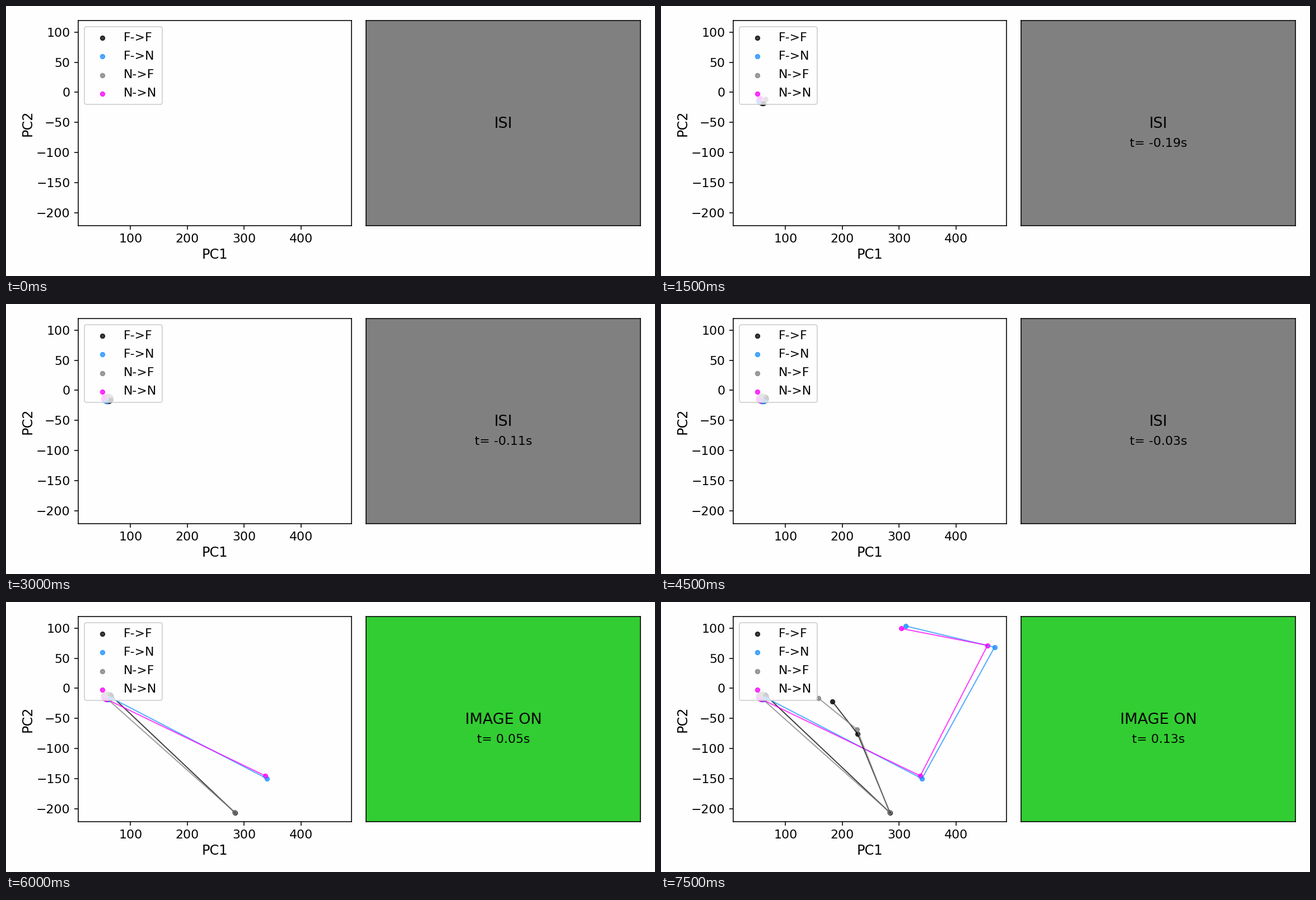
A matplotlib script for the animation above (8000 ms loop, 1159 by 483 pixels).

```python
from math import cos, radians, sin

import matplotlib.pyplot as plt
from matplotlib.animation import FuncAnimation

W, H, DPI = 1159, 483, 144
INTERVAL = 250
FRAMES_PER_STEP = 3
N_FRAMES = 32
REST_STEPS = 7

# Condition: colour, starting angle of the resting drift, points of the response
CONDITIONS = {
    "F->F": ("black", -95, [(284, -206.4), (227, -75.6), (182.6, -21.8)]),
    "F->N": ("dodgerblue", -164, [(340.3, -149.8), (468, 68.2), (311.7, 103.4)]),
    "N->F": ("gray", 20, [(283.2, -205.5), (226, -68.2), (158, -16.2)]),
    "N->N": ("magenta", 120, [(337.4, -145.2), (455.7, 71.4), (304, 99.3)]),
}


def rest_point(phase, k):
    """Before the image, activity drifts slowly around a small ellipse."""
    angle = radians(phase + 23 * k)
    return 59 + 7 * cos(angle), -13.5 + 4.5 * sin(angle)


def track(phase, response):
    return [rest_point(phase, k) for k in range(REST_STEPS)] + response


def pixel_axes(left, top, right, bottom):
    return fig.add_axes([left / W, 1 - bottom / H, (right - left) / W, (bottom - top) / H])


def label(x, baseline, size):
    return fig.text(x / W, 1 - baseline / H, "", fontsize=size, ha="center")


plt.rcParams["font.family"] = "DejaVu Sans"
fig = plt.figure(figsize=(W / DPI, H / DPI), dpi=DPI, facecolor="#fefefe")

plot_ax = pixel_axes(128.6, 26, 617.3, 393)
plot_ax.set_facecolor("#fefefe")
plot_ax.set_xlim(7.7, 489.4)
plot_ax.set_ylim(-221.3, 119.2)
plot_ax.set_xticks(range(100, 401, 100))
plot_ax.set_yticks(range(-200, 101, 50))
plot_ax.tick_params(labelsize=11)
plot_ax.set_xlabel("PC1", fontsize=12, labelpad=3)
plot_ax.set_ylabel("PC2", fontsize=12, labelpad=1.5)

MARKER = dict(s=14, alpha=0.75, zorder=1)
tracks = []
for name, (color, phase, response) in CONDITIONS.items():
    plot_ax.scatter([], [], color=color, label=name, **MARKER)
    tracks.append((color, track(phase, response)))
plot_ax.legend(loc="upper left", fontsize=11, labelspacing=0.6,
               borderpad=0.45, handletextpad=0.75)

# layers[k] holds the artists that appear at step k + 1
layers = []
for k in range(len(tracks[0][1])):
    layer = []
    for color, points in tracks:
        layer.append(plot_ax.scatter(*points[k], color=color, **MARKER))
        if k:
            xs, ys = zip(*points[k - 1:k + 1])
            layer += plot_ax.plot(xs, ys, color=color, lw=1, alpha=0.75)
    layers.append(layer)

state_ax = pixel_axes(643.2, 26, 1133, 393)
state_ax.set_xticks([])
state_ax.set_yticks([])
state_text = label(888, 218, 13.5)
time_text = label(888, 252, 11)


def draw(frame):
    step = frame // FRAMES_PER_STEP
    time = 0.01 + 0.04 * (step - REST_STEPS)
    image_on = time > 0
    for k, layer in enumerate(layers):
        for artist in layer:
            artist.set_visible(k < step)
    state_ax.set_facecolor("limegreen" if image_on else "gray")
    state_text.set_text("IMAGE ON" if image_on else "ISI")
    time_text.set_text(f"t= {time:.2f}s" if step else "")
    return []


anim = FuncAnimation(fig, draw, frames=N_FRAMES, interval=INTERVAL,
                     init_func=lambda: draw(0), repeat=True, repeat_delay=0)
plt.show()
```
